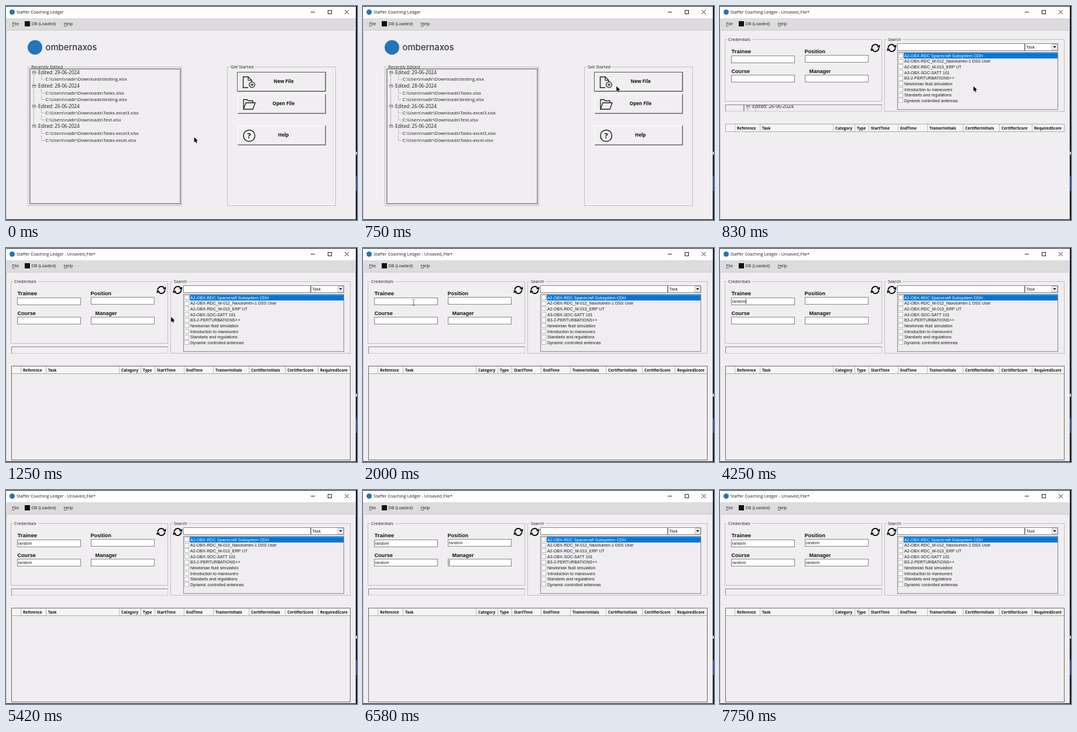
An HTML page with a canvas that plays this animation: 600 by 367 pixels, repeating every 8 s.

```html
<!DOCTYPE html>
<html lang="en">
<head>
<meta charset="utf-8">
<title>Staffer Coaching Ledger</title>
<style>
html, body { margin: 0; width: 100%; height: 100%; overflow: hidden; background: #16181d; }
canvas { display: block; width: 600px; height: 367px; }
</style>
</head>
<body>
<canvas id="stage" width="600" height="367"></canvas>
<script>
const g = document.getElementById('stage').getContext('2d');
const LOOP = 8000, SWITCH = 830, BLINK = 500;
const UI = '"Open Sans", "Noto Sans", sans-serif';
const ARIAL = '"Liberation Sans", sans-serif';
const BG = '#f0eef0', INK = '#1c1c1c', LINE = '#bfbdbf', EDGE = '#858385';
const APP = 'Staffer Coaching Ledger', WORD = 'random';
const BOX_W = 109, BOX_H = 13;

// Each field: label, entry box, focus time, first key time and ms per key
const fields = [
  { label: 'Trainee', lx: 19.5, ly: 81, size: 9.6, x: 19, y: 85, focus: 2170, key: 3670, step: 83 },
  { label: 'Course', lx: 19.5, ly: 114.6, size: 9.1, x: 19, y: 118, focus: 4330, key: 4420, step: 83 },
  { label: 'Position', lx: 144.5, ly: 80.6, size: 9, x: 145, y: 84, focus: 4920, key: 5500, step: 83 },
  { label: 'Manager', lx: 152.5, ly: 114.6, size: 9, x: 145, y: 118, focus: 6330, key: 7080, step: 34 }
];

const recent = [
  ['29-06-2024', 'testing'],
  ['28-06-2024', 'Tasks', 'testing'],
  ['26-06-2024', 'Tasks-excel3', 'Test'],
  ['25-06-2024', 'Tasks-excel3', 'Tasks-excel']
];

const tasks = [
  'A2-OBX-RDC Spacecraft Subsystem CDH', 'A2-OBX-RDC_M-012_Naxolumen-1 DSS User',
  'A2-OBX-RDC_M-013_ERP UT', 'A3-OBX-SOC-SATT 101', 'B3-2-PERTURBATIONS++',
  'Newtonian fluid simulation', 'Introduction to maneuvers',
  'Standarts and regulations', 'Dynamic controlled antennas'
];

const columns = [
  ['Reference', 25], ['Task', 68], ['Category', 193], ['Type', 230], ['StartTime', 254],
  ['EndTime', 304], ['TrainerInitials', 354], ['CertifierInitials', 415],
  ['CertifierScore', 477], ['RequiredScore', 533]
];

function rect(x, y, w, h, color) {
  g.fillStyle = color;
  g.fillRect(x, y, w, h);
}

function frame(x, y, w, h, color) {
  g.strokeStyle = color;
  g.lineWidth = 1;
  g.strokeRect(x + .5, y + .5, w - 1, h - 1);
}

// Sunken border: dark above and left, pale below and right
function inset(x, y, w, h) {
  frame(x, y, w, h, '#cfcdcf');
  rect(x, y, w, 1, EDGE);
  rect(x, y, 1, h, EDGE);
}

function text(s, x, y, size, color = INK, family = UI, weight = 400) {
  g.font = `${weight} ${size}px ${family}`;
  g.fillStyle = color;
  g.fillText(s, x, y);
}

function path(points, color, width = 1, close = false) {
  g.beginPath();
  points.forEach(([x, y]) => g.lineTo(x, y));
  if (close) g.closePath();
  g.strokeStyle = color;
  g.lineWidth = width;
  g.stroke();
}

function fillPath(points, color) {
  g.beginPath();
  points.forEach(([x, y]) => g.lineTo(x, y));
  g.fillStyle = color;
  g.fill();
}

function circle(x, y, r, color, width) {
  g.beginPath();
  g.arc(x, y, r, 0, 7);
  if (width) {
    g.strokeStyle = color;
    g.lineWidth = width;
    g.stroke();
  } else {
    g.fillStyle = color;
    g.fill();
  }
}

function dotted(x1, y1, x2, y2) {
  g.setLineDash([1, 1]);
  path([[x1, y1], [x2, y2]], '#8a8a8a');
  g.setLineDash([]);
}

function group(title, x, y, w, h, size, gap) {
  frame(x, y, w, h, LINE);
  rect(x + 4, y, gap, 1, BG);
  text(title, x + 6, y + 2.8, size);
}

function chrome(title) {
  rect(0, 0, 600, 367, '#16181d');
  rect(598, 292, 2, 25, '#2c50a4');
  rect(598, 250, 2, 5, '#c8c8cc');
  rect(0, 1, 598, 365, BG);
  rect(0, 1, 598, 20, '#fefefe');
  rect(0, 21, 598, 20, '#dddbdd');
  frame(0, 41, 598, 325, '#cac8ca');
  circle(10.5, 10.5, 4.5, '#2474b8');
  text(title, 18, 13.4, 7.25);
  rect(521, 10, 7, 1, '#222');
  frame(550, 7, 7, 7, '#222');
  path([[579, 7], [586, 14]], '#222');
  path([[586, 7], [579, 14]], '#222');
  text('File', 10.5, 33, 7.3);
  rect(10.5, 34, 4, 1, '#555');
  rect(32, 26, 9, 9, '#111');
  text('DB (Loaded)', 43.5, 33, 7.3);
  text('Help', 98.7, 33, 7.3);
  rect(99, 34, 5, 1, '#555');
}

function tree() {
  const pitch = 11.56;
  let row = 0, last = 0;
  rect(41, 107, 258, 233, '#efedef');
  frame(40, 107, 259, 233, '#8a888a');
  frame(41, 108, 257, 231, '#a8a6a8');
  for (const [date, ...files] of recent) {
    const y = 114 + row * pitch;
    if (row) dotted(47.5, last + 4, 47.5, y - 3);
    last = y;
    dotted(51, y + .5, 54, y + .5);
    frame(45, Math.round(y) - 3, 6, 6, '#999');
    rect(46, Math.round(y) - 1, 4, 1, '#333');
    text('Edited: ' + date, 55, y + 2.9, 8.15);
    files.forEach((name, i) => {
      const cy = y + (i + 1) * pitch;
      dotted(60.5, cy - 7, 60.5, cy);
      dotted(61, Math.round(cy) + .5, 66, Math.round(cy) + .5);
      text(`C:\\Users\\nadir\\Downloads\\${name}.xlsx`, 67.5, cy + 2.9, 7.8);
    });
    row += files.length + 1;
  }
}

function button(label, y, tx, focused) {
  rect(396, y, 151, 34, BG);
  rect(396, y, 151, 1, '#fff');
  rect(396, y, 1, 34, '#fff');
  rect(396, y + 33, 151, 1, '#6c6a6c');
  rect(546, y, 1, 34, '#6c6a6c');
  rect(397, y + 32, 149, 1, '#a9a7a9');
  rect(545, y + 1, 1, 32, '#a9a7a9');
  if (focused) frame(395, y, 152, 34, '#555');
  text(label, tx, y + 19, 8.05, '#111', UI, 700);
}

function home() {
  circle(49.5, 71, 12.5, '#2474b8');
  text('ombernaxos', 67.5, 75.5, 14.8, '#34363c', 'Inter, sans-serif', 500);
  group('Recently Edited', 37, 104, 264, 239, 7.6, 58);
  tree();
  group('Get Started', 378, 104, 186, 239, 7.4, 43);

  button('New File', 113, 457.5, true);
  path([[414, 140], [405.5, 140], [405.5, 121.5], [414, 121.5], [420, 127.5], [420, 130]], INK, 1.4);
  path([[414, 121.5], [414, 127.5], [420, 127.5]], INK, 1.2);
  circle(420.5, 135, 4.8, INK, 1.3);
  path([[418, 135], [423, 135]], INK, 1.2);
  path([[420.5, 132.5], [420.5, 137.5]], INK, 1.2);

  button('Open File', 151, 455.5);
  path([[406, 177], [406, 160.5], [412, 160.5], [414, 162.5], [422, 162.5], [422, 166]], INK, 1.3);
  path([[406, 177], [410, 166], [426, 166], [422, 177]], INK, 1.3, true);

  button('Help', 205, 465);
  circle(415.7, 222.5, 9.8, INK, 1.5);
  text('?', 412.5, 227.3, 13, INK, UI, 700);
}

function refresh(cx, cy) {
  for (const turn of [0, Math.PI]) {
    g.save();
    g.translate(cx, cy);
    g.rotate(turn);
    g.beginPath();
    g.arc(0, 0, 6, Math.PI * 1.02, Math.PI * 1.8);
    g.strokeStyle = '#000';
    g.lineWidth = 2;
    g.stroke();
    fillPath([[8, -5.5], [7.4, 0], [2.4, -2.2]], '#000');
    g.restore();
  }
}

function entry(x, y, w) {
  rect(x, y, w, BOX_H, '#fff');
  frame(x, y, w, BOX_H, EDGE);
}

function typed(f, t) {
  return Math.max(0, Math.min(WORD.length, Math.floor((t - f.key) / f.step) + 1));
}

function credentials(t) {
  group('Credentials', 8, 57, 269, 107, 7.2, 43);
  refresh(265.5, 72);
  const active = fields.filter(f => t >= f.focus).pop();
  for (const f of fields) {
    const count = typed(f, t), s = WORD.slice(0, count);
    text(f.label, f.lx, f.ly, f.size, '#111', ARIAL, 700);
    entry(f.x, f.y, BOX_W);
    text(s, f.x + 1.8, f.y + 8.9, 6.9, INK, ARIAL);
    if (f !== active) continue;
    const since = count ? f.key + (count - 1) * f.step : f.focus;
    if (Math.floor((t - since) / BLINK) % 2 === 0) {
      rect(Math.round(f.x + 2 + g.measureText(s).width), f.y + 2, 1, 9, '#555');
    }
  }
}

function search() {
  group('Search', 281, 57, 308, 124, 7.1, 27);
  refresh(293.5, 72);
  entry(303, 64, 218);
  entry(521, 64, 57);
  text('Task', 523.5, 73, 7.1, INK, ARIAL);
  rect(567, 65, 10, 11, '#eceaec');
  frame(567, 65, 10, 11, '#c4c2c4');
  fillPath([[569.5, 69], [574.5, 69], [572, 72]], '#000');
  rect(303, 79, 275, 99, '#efedef');
  frame(303, 79, 275, 99, EDGE);
  rect(314, 80.4, 263, 9.63, '#0078d7');
  tasks.forEach((name, i) => {
    const y = 85.2 + i * 9.63;
    rect(305, Math.round(y) - 4, 8, 8, '#fff');
    frame(305, Math.round(y) - 4, 8, 8, '#bcbabc');
    text(name, 315, y + 2.6, 7.1, i ? INK : '#fff', ARIAL);
  });
}

function table(complete) {
  rect(9, 202, 580, 14, '#f6f5f6');
  frame(9, 202, 580, 14, '#a9a7a9');
  for (const [name, x] of columns) {
    rect(x, 203, 1, 12, '#bebcbe');
    text(name, x + 4, 211.7, 6.5, '#111', UI, 700);
  }
  if (complete) frame(9, 202, 580, 162, '#686668');
}

function editor(t) {
  const settled = t >= SWITCH + 90;
  credentials(t);
  search();
  if (!settled) {
    // Remains of the start page before the strip is repainted
    g.save();
    g.beginPath();
    g.rect(9, 169, 268, 12);
    g.clip();
    tree();
    g.restore();
  }
  inset(9, 169, 268, 12);
  table(settled);
}

function arrow(x, y) {
  const shape = [[0, 0], [0, 9], [2, 7.1], [3.5, 10.2], [4.9, 9.5], [3.5, 6.5], [6.3, 6.3]]
    .map(([dx, dy]) => [x + dx, y + dy]);
  path(shape, '#fff', 1, true);
  fillPath(shape, '#000');
}

function beam(x, y) {
  const gray = '#777';
  rect(x, y - 4, 1, 9, gray);
  for (const dy of [-5, 5]) {
    rect(x - 2, y + dy, 2, 1, gray);
    rect(x + 1, y + dy, 2, 1, gray);
  }
}

function pointer(t) {
  if (t >= fields[0].key) return;
  const go = (from, to, start, end) => {
    const p = Math.max(0, Math.min(1, (t - start) / (end - start)));
    const e = p * p * (3 - 2 * p);
    return from.map((v, i) => v + (to[i] - v) * e);
  };
  const [x, y] = t < SWITCH
    ? go([321.7, 225], [433.3, 137.5], 0, 750)
    : go([433.3, 137.5], [86, 93], SWITCH, 1750);
  const overField = fields.some(f => x > f.x && x < f.x + BOX_W && y > f.y && y < f.y + BOX_H);
  if (t >= SWITCH && overField) beam(Math.round(x), Math.round(y));
  else arrow(x, y);
}

function draw(t) {
  const start = t < SWITCH;
  chrome(start ? APP : APP + ' - Unsaved_File*');
  if (start) home();
  else editor(t);
  pointer(t);
}

// The screen updates twelve times a second
let shown = -1;
function tick(now) {
  const step = Math.floor((now % LOOP + 4) * 12 / 1000);
  const t = Math.round(step * 100 / 12) * 10 % LOOP;
  if (t !== shown) draw(shown = t);
  requestAnimationFrame(tick);
}
draw(0);
requestAnimationFrame(tick);
</script>
</body>
</html>
```
